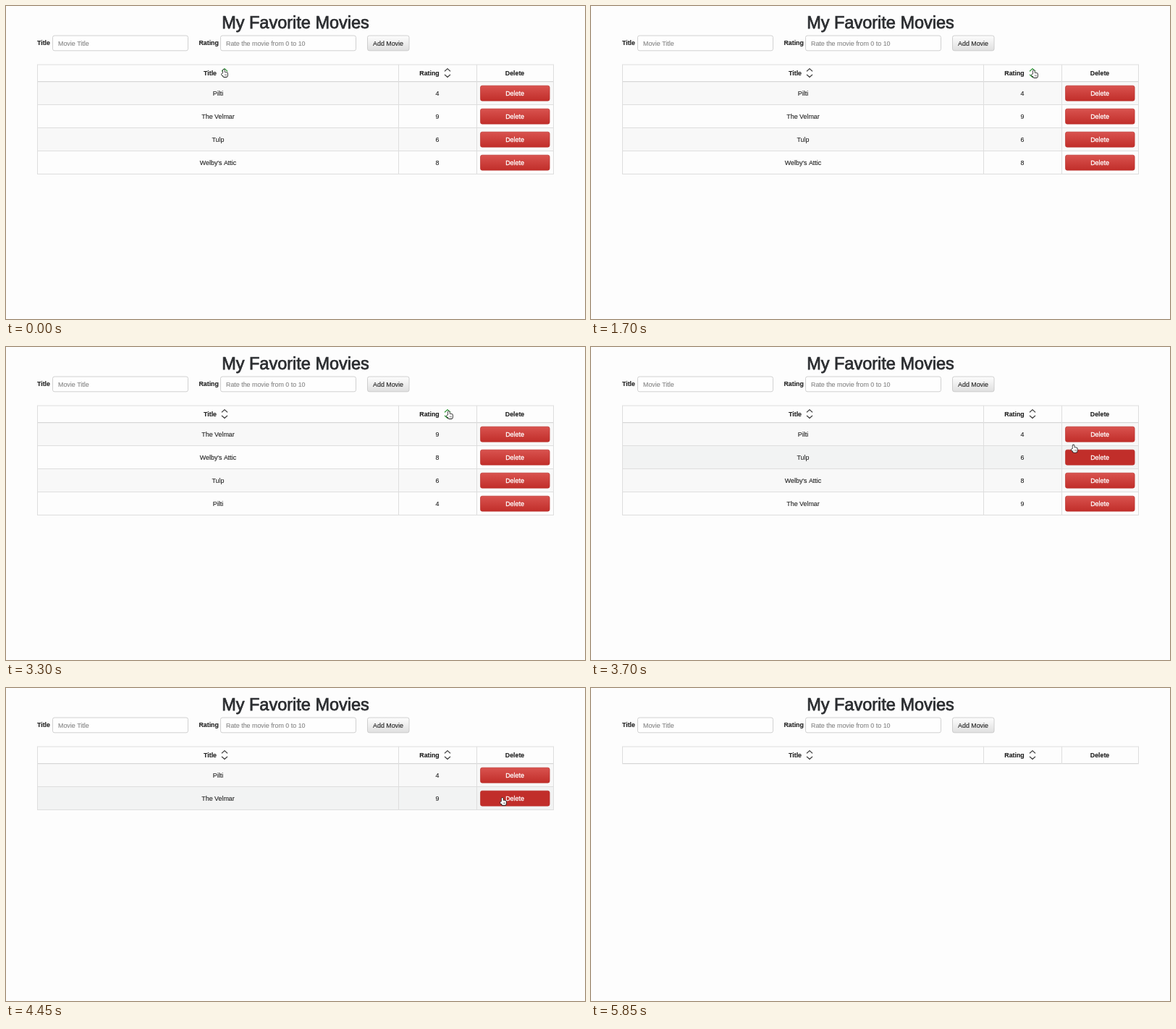
Write an HTML page with a canvas that moves like this. It is 800 px wide and 433 px high and loops after 5950 ms.

```html
<!DOCTYPE html>
<html lang="en">
<head>
<meta charset="utf-8">
<title>My Favorite Movies</title>
<style>
html, body { margin: 0; width: 100%; height: 100%; overflow: hidden; background: #fdfdfd; }
canvas { display: block; }
</style>
</head>
<body>
<canvas id="stage" width="800" height="433"></canvas>
<script>
const ctx = document.getElementById('stage').getContext('2d');
const LOOP = 5950, STEP = 50;
const FONT = '"Liberation Sans", Arial, sans-serif';
const PAPER = '#fdfdfd', LINE = '#dedede';
const HEAD = 81, TOP = 104, ROW = 32;
const COL = { left: 43, rating: 542, remove: 650, right: 756 };
const BUTTON = { x: 655.5, w: 95.6, h: 21 };
const PRESS = 110, POINTER_END = 5350;

const movies = [
  { title: 'Pilti', rating: 4 },
  { title: 'The Velmar', rating: 9 },
  { title: 'Tulp', rating: 6 },
  { title: "Welby's Attic", rating: 8 }
];

// Clicking the same heading again flips the order.
const sortClicks = { title: [0, 350, 1150], rating: [2150, 2750, 3450] };

// The second row is removed until only one is left.
const deletes = movies.map((m, i) => ({
  at: 4000 + 330 * i,
  row: Math.min(1, movies.length - 1 - i)
}));

const moves = [
  { at: 300, time: 300, x: 305, y: 94 },
  { at: 1250, time: 350, x: 613, y: 94 },
  { at: 3500, time: 300, x: 687, y: 157 },
  { at: 4670, time: 180, x: 687, y: 130 }
];

function pointerAt(t) {
  if (t >= POINTER_END) return null;
  const p = { x: 302, y: 93 };
  for (const m of moves) {
    const k = Math.min(1, Math.max(0, (t - m.at) / m.time));
    const e = k * k * (3 - 2 * k);
    p.x += (m.x - p.x) * e;
    p.y += (m.y - p.y) * e;
  }
  return p;
}

function rowsAt(t) {
  const key = t < sortClicks.rating[0] ? 'title' : 'rating';
  const clicks = sortClicks[key].filter(at => at <= t).length;
  const dir = clicks % 2 ? 1 : -1;
  const rows = [...movies].sort((a, b) => (a[key] < b[key] ? -dir : dir));
  for (const d of deletes) if (t >= d.at) rows.splice(d.row, 1);
  return rows;
}

function text(str, x, y, { size = 8.9, bold = false, color = '#222', align = 'center', weight = 0.12 } = {}) {
  ctx.font = `${bold ? 'bold ' : ''}${size}px ${FONT}`;
  ctx.textAlign = align;
  ctx.fillStyle = ctx.strokeStyle = color;
  ctx.lineWidth = weight;
  ctx.fillText(str, x, y);
  ctx.strokeText(str, x, y);
}

const label = (str, x, y, align) => text(str, x, y, { size: 8.8, bold: true, align });

function box(x, y, w, h, fill, border, line = 0.8) {
  ctx.beginPath();
  ctx.roundRect(x, y, w, h, 2.5);
  ctx.fillStyle = fill;
  ctx.strokeStyle = border;
  ctx.lineWidth = line;
  ctx.fill();
  ctx.stroke();
}

function fade(y0, y1, from, to) {
  const g = ctx.createLinearGradient(0, y0, 0, y1);
  g.addColorStop(0, from);
  g.addColorStop(1, to);
  return g;
}

function rect(x, y, w, h, color) {
  ctx.fillStyle = color;
  ctx.fillRect(x, y, w, h);
}

function field(name, hint, x, boxX) {
  label(name, x, 54, 'left');
  box(boxX, 41, 187, 20.8, '#fefefe', '#c6c6c6');
  text(hint, boxX + 7.5, 54.5, { color: '#858585', align: 'left' });
}

function drawForm() {
  text('My Favorite Movies', 400, 30.5, { size: 23.5, color: '#2b2d30', weight: 0.75 });
  field('Title', 'Movie Title', 43, 64.5);
  field('Rating', 'Rate the movie from 0 to 10', 266.5, 296.5);
  box(499.5, 41, 57.5, 20.8, fade(41, 62, PAPER, '#dfdfdf'), '#c4c4c4');
  text('Add Movie', 528, 54.5);
}

function drawSortIcon(x, hot) {
  ctx.strokeStyle = hot ? '#128a1c' : '#2a2a2a';
  ctx.lineWidth = 1.15;
  for (const side of [-1, 1]) {
    const y = 92.6 + side * 2.2;
    ctx.beginPath();
    ctx.moveTo(x - 4, y);
    ctx.lineTo(x, y + side * 3.7);
    ctx.lineTo(x + 4, y);
    ctx.stroke();
  }
}

function drawButton(y, state) {
  const { x, w, h } = BUTTON;
  if (state === 'press') {
    box(x, y, w, h, '#ab2521', '#a9cdf3', 3.2);
    box(x, y, w, h, '#ab2521', '#4b8fdb', 1.4);
  } else {
    const fill = state === 'hover' ? '#c12e2a' : fade(y, y + h, '#d9534f', '#c12e2a');
    box(x, y, w, h, fill, '#b92c28', 0.65);
  }
  text('Delete', 703, y + 13.8, { color: '#fff', weight: 0.3 });
}

function drawGrid(rows, hot) {
  const width = COL.right - COL.left + 1;
  const bottom = TOP + rows.length * ROW;
  rows.forEach((m, i) => {
    const shade = i === hot ? '#f2f3f3' : i % 2 ? PAPER : '#f8f8f8';
    rect(COL.left, TOP + i * ROW, width, ROW, shade);
  });
  rows.forEach((m, i) => rect(COL.left, TOP + (i + 1) * ROW, width, 1, LINE));
  rect(COL.left, HEAD - 0.4, width, 1, LINE);
  rect(COL.left, TOP, width, 1.2, '#d6d6d6');
  for (const x of Object.values(COL)) rect(x, HEAD, 1, bottom - HEAD + 1, LINE);
}

// Draws the table and tells whether the pointer is over something clickable.
function drawTable(t, rows, p) {
  const inHead = p && p.y > HEAD && p.y < TOP;
  const overTitle = inHead && p.x < COL.rating;
  const overRating = inHead && !overTitle && p.x < COL.remove;
  const hot = p && p.y > TOP ? Math.floor((p.y - TOP) / ROW) : -1;
  const inButton = p && p.x > BUTTON.x && p.x < BUTTON.x + BUTTON.w;
  const pressed = deletes.some(d => t >= d.at - PRESS && t < d.at);

  drawGrid(rows, hot);
  label('Title', 282, 96);
  label('Rating', 585, 96);
  label('Delete', 703, 96);
  drawSortIcon(302, overTitle);
  drawSortIcon(610, overRating);

  rows.forEach((m, i) => {
    const y = TOP + i * ROW;
    const over = i === hot && inButton;
    text(m.title, 293, y + 20);
    text(m.rating, 596, y + 20);
    drawButton(y + 6.2, over ? (pressed ? 'press' : 'hover') : '');
  });
  return overTitle || overRating || (rows[hot] && inButton);
}

function outlined(shape, line, fill) {
  ctx.lineJoin = 'round';
  ctx.lineWidth = 1.6;
  ctx.strokeStyle = line;
  ctx.fillStyle = fill;
  ctx.stroke(shape);
  ctx.fill(shape);
}

function handShape() {
  const s = new Path2D();
  s.roundRect(-2.2, -5, 2, 7, 1);
  s.roundRect(-2.2, -1.3, 6.2, 6.4, 2);
  s.roundRect(-3.9, 0.3, 3, 2.6, 1.2);
  return s;
}

function arrowShape() {
  const s = new Path2D();
  s.moveTo(-3, -5);
  s.lineTo(-3, 4);
  s.lineTo(-0.6, 2);
  s.lineTo(3.5, 1.5);
  s.closePath();
  s.rect(-0.4, 1, 1.4, 4);
  return s;
}

const HAND = handShape(), ARROW = arrowShape();

function drawPointer(p, hand) {
  ctx.save();
  ctx.translate(p.x, p.y);
  if (hand) {
    outlined(HAND, '#222', '#fff');
    for (let x = -0.2; x < 3; x += 1.4) rect(x, 1.2, 0.5, 2.4, '#555');
  } else {
    outlined(ARROW, '#fff', '#111');
  }
  ctx.restore();
}

function draw(t) {
  const p = pointerAt(t);
  rect(0, 0, 800, 433, PAPER);
  drawForm();
  const hand = drawTable(t, rowsAt(t), p);
  if (p) drawPointer(p, hand);
}

const start = performance.now();
function tick() {
  const t = (performance.now() - start) % LOOP;
  draw(Math.floor(t / STEP) * STEP);
  requestAnimationFrame(tick);
}
tick();
</script>
</body>
</html>
```
